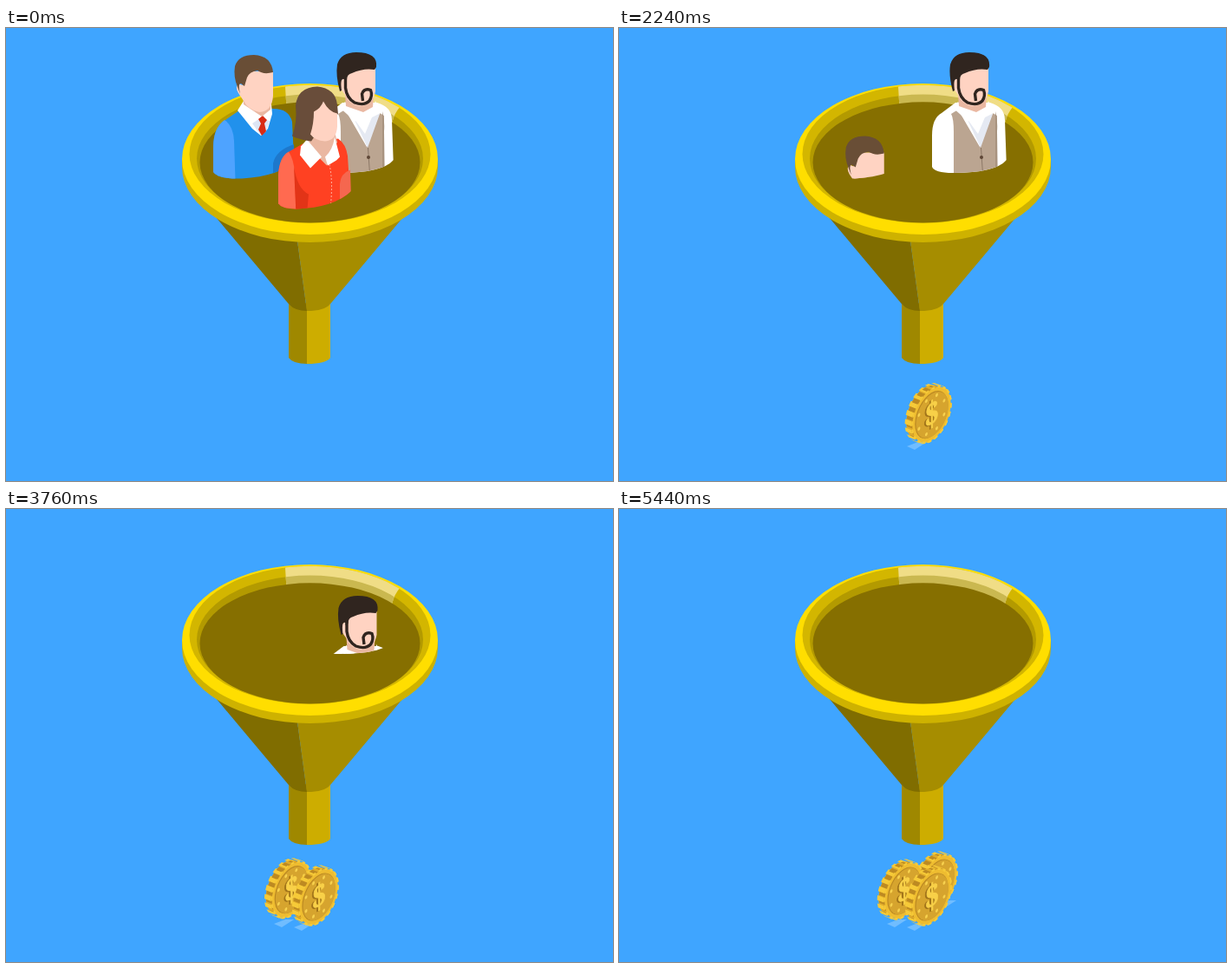
Write an HTML page that moves like this. It is 700 px wide and 522 px high and loops after 8000 ms.

```html
<!DOCTYPE html>
<html lang="en">
<head>
<meta charset="utf-8">
<title>Funnel</title>
<style>
html, body { margin: 0; width: 100%; height: 100%; overflow: hidden; background: #3fa5ff; }
svg { display: block; width: 700px; height: 522px; }
.coin text { font: bold 33px "Noto Serif", "Liberation Serif", serif; text-anchor: middle; }
</style>
</head>
<body>
<svg viewBox="0 0 700 522">
  <defs>
    <clipPath id="waterBlue"><path d="M200 0H345V140L333 152Q316 171 272 173.500Q244 174 239 166L200 150Z"/></clipPath>
    <clipPath id="waterVest"><path d="M340 0H470V130L447 152Q434 167 385 167Q364 167 361 160L340 150Z"/></clipPath>
    <clipPath id="waterRed"><path d="M290 0H420V170L398 188Q378 207 335 208.500Q318 208 315 203L290 190Z"/></clipPath>
    <clipPath id="shine"><path d="M321.500 60L324 100L440 119L445.500 108Q448 98 455 90L450 60Z"/></clipPath>
    <clipPath id="solid"><path d="M200 172Q228 166 250 172Q285 175 305 165Q325 156 350 162Q390 170 425 165Q440 160 447 148Q456 138 478 147L500 165L470 222L440 240Q415 277 388 277L340 260Q290 243 248 226Z"/></clipPath>
    <g id="funnel">
      <path id="pipeL" fill="#9f8800"/>
      <path id="pipeR" fill="#cdad00"/>
      <path id="coneL" fill="#806d00"/>
      <path id="coneR" fill="#a68d00"/>
      <path d="M203 151V160A147.500 87 0 0 0 498 160V151Z" fill="#ceb200"/>
      <ellipse cx="350.500" cy="151" rx="147.500" ry="87" fill="#ffde00"/>
      <ellipse cx="350.500" cy="145.200" rx="139" ry="79.500" fill="#d3b600"/>
      <ellipse cx="350.500" cy="150.500" rx="130.500" ry="74" fill="#b39a00"/>
      <g clip-path="url(#shine)">
        <ellipse cx="350.500" cy="145.200" rx="139" ry="79.500" fill="#f0dd86"/>
        <ellipse cx="350.500" cy="150.500" rx="130.500" ry="74" fill="#cab850"/>
      </g>
      <ellipse cx="350.500" cy="154.800" rx="127" ry="69.500" fill="#866f00"/>
    </g>
  </defs>

  <rect width="700" height="522" fill="#3fa5ff"/>
  <path id="ghost" fill="#3a6f80" opacity=".17"/>
  <g id="coins"></g>
  <use id="body" href="#funnel"/>
  <use id="firm" href="#funnel" clip-path="url(#solid)"/>
  <path id="rim" fill="#ffde00" fill-rule="evenodd"
    d="M203 151a147.500 87 0 1 0 295 0a147.500 87 0 1 0 -295 0ZM211.500 145.200a139 79.500 0 1 0 278 0a139 79.500 0 1 0 -278 0Z"/>

  <g clip-path="url(#waterBlue)"><g id="blueMan">
    <path d="M239 190V138Q239 117 250 108L272 93H306Q326 92 330 108L334 190Z" fill="#2191ec"/>
    <path d="M239 190V138Q239 115 252 106Q262 112 263 130L265 190Z" fill="#4ea3ff"/>
    <path d="M308 190V156Q311 141 332 134L334 190Z" fill="#1d78cc"/>
    <path d="M267 95L274 84L306 88L307 99L302 116L294 124L284 116Z" fill="#fff"/>
    <path d="M284 110L293 104L304 107L300 119L294 124Z" fill="#dde5f4"/>
    <path d="M291 105L296 101L301 106L298 110L300 119L295 124L291 117L294 110Z" fill="#d92b14"/>
    <path d="M273 75L306 82L305 94L295 102L274 88Z" fill="#eab8a2"/>
    <path d="M272 50H308V78Q307 96 292 97Q279 94 274 84L268 75Q264 68 268 64L273 66Z" fill="#ffd3c2"/>
    <path d="M267 68Q262 56 264 44Q268 31 286 31Q306 32 308 51Q297 54 290 49Q281 50 278 57L275 67L271 64Q267 63 270 76Z" fill="#694e36"/>
  </g></g>

  <g clip-path="url(#waterVest)"><g id="vestMan">
    <path d="M361 190V124Q361 104 372 98L388 86H428Q445 91 445 106L448 190Z" fill="#fff"/>
    <path d="M386 190V120Q386 104 383 99L391 94L416 137L431 98L436 101V190Z" fill="#bba591"/>
    <path d="M434 96Q437 106 436 119L437 190H434Z" fill="#a8937f"/>
    <path d="M401 104L414 122L424 98L431 99L417 138Z" fill="#e5e9f2"/>
    <path d="M385 92L391 85L414 109L402 107Z" fill="#fff"/>
    <path d="M426 84L432 98L420 104Z" fill="#fff"/>
    <path d="M391 76L424 78L423 91L412 97L392 90Z" fill="#eab8a2"/>
    <path d="M389 46H426V73Q423 90 406 90Q395 87 391 77L386 70Q383 62 388 59Z" fill="#ffd3c2"/>
    <path d="M385 73Q380 55 382 42Q386 28 404 28Q429 28 427 45L425 48Q412 46 399 52Q393 53 393 60L390 62V59Q385 57 387 72Z" fill="#30251f"/>
    <path d="M391.500 56V69Q393 81 402 86Q413 90 419 84Q423 78 420.500 71.500Q413 69 410.500 76L411.500 84" stroke="#30251f" stroke-width="3.400" fill="none"/>
    <path d="M417.500 138L421 190" stroke="#8d7866" fill="none"/>
    <circle cx="418" cy="149" r="2" fill="#5e4636"/>
  </g></g>

  <g clip-path="url(#waterRed)"><g id="redWoman">
    <path d="M314 225V168Q315 147 328 140L342 132L383 126Q392 132 394 146L399 225Z" fill="#ff4122"/>
    <path d="M314 225V168Q315 147 326 141Q332 150 333 166L335 225Z" fill="#ff6a50"/>
    <path d="M332 158Q336 184 349 190L346 225H335Z" fill="#e23417"/>
    <path d="M385 225V178Q386 166 397 162L399 225Z" fill="#f5674f"/>
    <path d="M346 120L379 118L382 130L370 157L350 137Z" fill="#eab8a2"/>
    <path d="M340 135L347 127L364 147L351 160L339 145Z" fill="#fff"/>
    <path d="M379 124L385 147L381 151L371 157L368 147Q377 139 379 124Z" fill="#fff"/>
    <path d="M373 156Q378 178 373 215" stroke="#ffb09f" stroke-dasharray="2 2" fill="none"/>
    <path d="M330 123Q336 107 334 88Q336 67 359 66Q380 68 382 87L383 98L375 96L352 129Q338 127 330 123Z" fill="#694d3a"/>
    <path d="M355 95Q363 91 366 83Q372 95 382 97V112Q381 128 368 129Q356 128 351 121Q355 109 355 95Z" fill="#ffd3c2"/>
  </g></g>
</svg>

<script>
const LOOP = 8000, STEP = 80;
const $ = id => document.getElementById(id);
const clamp = u => Math.max(0, Math.min(1, u));
const easeInOut = u => (1 - Math.cos(Math.PI * clamp(u))) / 2;
const easeOut = u => 1 - (1 - clamp(u)) ** 3;

const people = [
  { id: 'redWoman', start: -80, drop: 145, drift: 0 },
  { id: 'blueMan', start: 1480, drop: 145, drift: -3.5 },
  { id: 'vestMan', start: 3120, drop: 144, drift: 3 }
];
const coins = [
  { start: 1440, x: 356, y: 446, shade: [332, 477] },
  { start: 2960, x: 324, y: 439, shade: [309, 473] },
  { start: 4400, x: 363, y: 430, shade: [366, 451], late: true }
];

// Funnel pose by age: half width, joint y, pipe bottom y, bulge, opacity
const rest = [24, 318, 380, 0, 1];
const wide = [30, 320, 388, 7, .78];
const poses = [rest, [26, 319, 383, 3, .9], wide, [21.5, 310, 367, 0, .78], [25, 318, 382, 1, .9]];

function outline([w, j, b, k]) {
  const half = (side, split) => {
    const at = d => 350 + side * d;
    const ctrl = `${at((108 + w) / 2 + k)} ${(218 + j) / 2 + k}`;
    return {
      cone: `M${at(108)} 218Q${ctrl} ${at(w)} ${j}Q${at(w - 7)} ${j + 8} ${split} ${j + 8}L335 238Z`,
      pipe: `M${at(w)} ${j - 1}V${b}Q${at(w - 5)} ${b + 7} ${split} ${b + 7}V${j - 1}Z`
    };
  };
  return [half(-1, 347), half(1, 347)];
}

function coinFace() {
  const n = 40, r = 26, dx = -7.5, dy = -3;
  const point = (a, s) => [.87 * s * Math.cos(a), -.5 * s * Math.cos(a) + 1.15 * s * Math.sin(a)];
  let edge = '', dots = '';
  for (let i = 0; i < n; i++) {
    const s = i % 2 ? r - 1.5 : r + .8;
    const [ax, ay] = point(i / n * 2 * Math.PI, s), [bx, by] = point((i + 1.1) / n * 2 * Math.PI, s);
    edge += `<path d="M${ax} ${ay}L${bx} ${by}l${dx} ${dy}L${ax + dx} ${ay + dy}Z" fill="${i % 2 ? '#bd8a22' : '#f6ca38'}"/>`;
  }
  for (let i = 0; i < 8; i++) {
    const a = (i + .5) / 4 * Math.PI;
    dots += `<circle cx="${18 * Math.cos(a)}" cy="${18 * Math.sin(a)}" r="1.700" fill="#f7d14e"/>`;
  }
  const iso = 'matrix(.87 -.5 0 1.15';
  return `<g transform="translate(4.500 1)"><circle r="25" fill="#e0ac2a" transform="${iso} ${dx} ${dy})"/>${edge}
    <g transform="${iso} 0 0)">
    <circle r="25.500" fill="#eebc30"/>
    <circle r="25.800" fill="none" stroke="#f6ca38" stroke-width="2" stroke-dasharray="4.050"/>
    <circle r="22" fill="#b98722"/><circle cx=".8" cy=".6" r="21.500" fill="#d6a42e"/>${dots}
    <text x="-1.500" y="11" fill="#a1741b" stroke="#a1741b">$</text>
    <text x=".5" y="11" fill="#f8d048" stroke="#f8d048" stroke-width=".8">$</text></g></g>`;
}

$('coins').innerHTML =
  coins.map(({ shade: [x, y] }, i) =>
    `<path id="shade${i}" d="M${x} ${y + 5}L${x + 13} ${y}H${x + 23}L${x + 9} ${y + 9}Z" fill="#70bdff"/>`).join('') +
  coins.map((c, i) => `<g id="coin${i}" class="coin">${coinFace()}</g>`).reverse().join('');

const ghostParts = outline(wide);
$('ghost').setAttribute('d', ghostParts.map(h => h.cone + h.pipe).join(''));

function draw(time) {
  const t = Math.floor(time % LOOP / STEP) * STEP;

  for (const p of people) {
    const u = (t - p.start) / 1280, sunk = easeInOut(u);
    $(p.id).setAttribute('transform', `translate(${p.drift * sunk} ${p.drop * sunk})`);
    $(p.id).style.visibility = u >= 1 ? 'hidden' : 'visible';
  }

  let phase = 0;
  coins.forEach((c, i) => {
    const age = t - c.start, p = easeOut(age / 1040);
    if (age >= 0 && age < poses.length * STEP) phase = age / STEP;
    const side = c.late ? easeInOut((age - 480) / 560) : p;
    const g = $('coin' + i);
    g.setAttribute('transform', `translate(${350 + (c.x - 350) * side} ${330 + (c.y - 330) * p})`);
    g.style.visibility = age >= 120 ? 'visible' : 'hidden';
    $('shade' + i).style.opacity = clamp((age - 480) / 240);
  });

  const pose = poses[phase], [left, right] = outline(pose);
  $('coneL').setAttribute('d', left.cone);
  $('coneR').setAttribute('d', right.cone);
  $('pipeL').setAttribute('d', left.pipe);
  $('pipeR').setAttribute('d', right.pipe);
  $('body').style.opacity = pose[4];
  $('firm').style.visibility = phase ? 'visible' : 'hidden';
  $('rim').style.visibility = $('ghost').style.visibility = phase === 3 ? 'visible' : 'hidden';
}

const began = performance.now();
function tick() {
  draw(performance.now() - began);
  requestAnimationFrame(tick);
}
tick();
</script>
</body>
</html>
```
